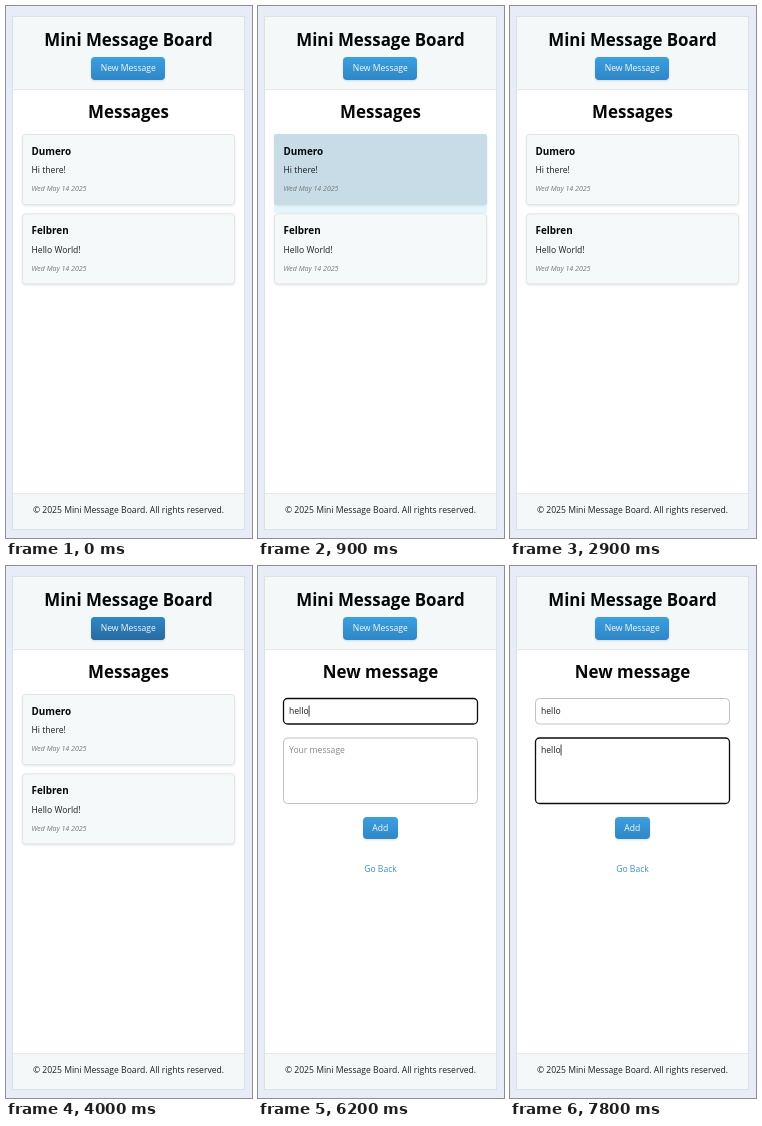
Write an HTML page that moves like this. It is 246 by 532 pixels and loops after 8000 ms.

```html
<!DOCTYPE html>
<html lang="en">
<head>
<meta charset="utf-8">
<title>Mini Message Board</title>
<style>
  html, body { margin: 0; width: 100%; height: 100%; overflow: hidden; background: #e8ecf7; }
  svg { display: block; width: 246px; height: 532px; font: 8.6px "Open Sans", "Noto Sans", sans-serif; fill: #1b1f22; }
  text { white-space: pre; }
  .mid { text-anchor: middle; }
  .title { font-weight: 700; font-size: 16.9px; fill: #050708; }
  .name { font-weight: 700; font-size: 9.9px; fill: #050708; }
  .date { font-style: italic; font-size: 7px; fill: #747a7e; }
  .link { fill: #3a8fca; }
  .hint { fill: #85898c; }
  .label { fill: #f4f9fd; }
  .option { font-size: 14px; fill: #202224; }
  .card { fill: #f5f9f9; stroke: #e0e5e7; filter: drop-shadow(0 1px 1px rgba(0, 0, 0, .1)); }
  .field { fill: #fff; stroke: #bfc2c4; }
  .field.focus { stroke: #0c0e10; stroke-width: 1.3; }
  .bar { fill: #f4f8f9; }
  .rule { fill: #e3e8ea; }
  .button { filter: drop-shadow(0 1px 1px rgba(0, 0, 0, .12)); }
  .popup { fill: #fff; filter: drop-shadow(0 1px 2px rgba(0, 0, 0, .28)); }
  .tap { fill: #33b5e5; }
</style>
</head>
<body>
<svg viewBox="0 0 246 532">
  <defs>
    <linearGradient id="blue" x2="0" y2="1">
      <stop stop-color="#3b9fe0"/><stop offset="1" stop-color="#2f86c6"/>
    </linearGradient>
    <linearGradient id="deep" x2="0" y2="1">
      <stop stop-color="#2f87c6"/><stop offset="1" stop-color="#286a9f"/>
    </linearGradient>
  </defs>

  <rect width="246" height="532" fill="#e8ecf7"/>
  <rect x="6.5" y="10.5" width="232" height="513" fill="#fff" stroke="#dce0e8"/>
  <rect class="bar" x="7" y="11" width="231" height="72"/>
  <rect class="rule" x="7" y="83" width="231" height="1"/>
  <rect class="bar" x="7" y="488" width="231" height="35"/>
  <rect class="rule" x="7" y="487" width="231" height="1"/>
  <text class="title mid" x="122.5" y="40">Mini Message Board</text>
  <rect class="button" x="85" y="51" width="74" height="23" rx="4" fill="url(#blue)"/>
  <rect id="newHover" x="85" y="51" width="74" height="23" rx="4" fill="url(#deep)"/>
  <text class="label mid" x="122.3" y="65">New Message</text>
  <text class="mid" x="122.5" y="507">© 2025 Mini Message Board. All rights reserved.</text>

  <g id="list">
    <text class="title mid" x="122.5" y="112">Messages</text>
    <g id="cards"></g>
  </g>

  <g id="detail">
    <text class="name mid" x="122.3" y="121.5">Dumero</text>
    <rect x="94" y="134.5" width="57" height="1" fill="#a9adb0"/>
    <text class="mid" x="122.3" y="154">Hi there!</text>
    <text class="date mid" x="122.3" y="177">Wed May 14 2025</text>
    <rect id="linkTap" class="tap" x="76" y="189.5" width="93" height="13.5"/>
    <text id="back" class="link mid" x="122.5" y="199">Back to message board</text>
  </g>

  <g id="form">
    <text class="title mid" x="122.5" y="112">New message</text>
    <rect id="nameField" class="field" x="25.5" y="132.5" width="194" height="25.5" rx="4"/>
    <rect id="bodyField" class="field" x="25.5" y="172" width="194" height="65.5" rx="4"/>
    <text id="nameText" x="31" y="148"></text>
    <text id="bodyText" x="31" y="187"></text>
    <rect id="caret" width="0.8" height="11" fill="#111"/>
    <rect class="button" x="105" y="251" width="35" height="22" rx="4" fill="url(#blue)"/>
    <text class="label mid" x="122.3" y="265">Add</text>
    <text class="link mid" x="122.5" y="306">Go Back</text>
    <g id="popup">
      <rect id="popupBox" class="popup" x="74" y="283" width="156.5" rx="5"/>
      <rect id="pick" x="74" y="287" width="156.5" height="36" fill="#eceef0"/>
      <g id="options"></g>
    </g>
  </g>
</svg>

<script>
const LOOP = 8000, TICK = 100;
const $ = id => document.getElementById(id);
const show = (id, on) => { $(id).style.display = on ? "" : "none"; };
const fade = (id, value) => $(id).setAttribute("opacity", value);

// Value of the last [time, value] entry that has begun
const at = (table, t) => table.reduce((v, [start, next]) => t >= start ? next : v, table[0][1]);

const cardMarkup = (name, message, y, extra = "") => `
  <rect class="card" x="16.5" y="${y + .5}" width="212" height="70" rx="3"/>${extra}
  <text class="name" x="25.5" y="${y + 21}">${name}</text>
  <text x="25.5" y="${y + 39.3}">${message}</text>
  <text class="date" x="25.5" y="${y + 57.3}">Wed May 14 2025</text>`;

$("cards").innerHTML =
  cardMarkup("Dumero", "Hi there!", 128, `
    <rect id="cardHover" x="16" y="128" width="213" height="71" rx="3" fill="#dee1e6"/>
    <rect id="cardTap" class="tap" x="16" y="128" width="213" height="79"/>`) +
  cardMarkup("Felbren", "Hello World!", 207.3);

const page = [[0, "list"], [1300, "detail"], [2900, "list"], [4400, "form"]];
const cardHover = [[0, 0], [600, .25], [700, .5], [800, .75], [900, 1], [1300, 0]];
const cardTap = [[0, 0], [600, .4], [700, .3], [800, .2], [900, .13], [1300, 0]];
const linkTap = [[0, 0], [2300, .4], [2400, .25], [2500, .13]];
const newHover = [[0, 0], [3700, .25], [3800, .5], [3900, .75], [4000, 1], [4400, 0]];
const focus = [[0, ""], [4900, "name"], [6500, "body"]];
const nameTyped = [[0, ""], [5400, "h"], [5500, "he"], [6100, "hello"]];
const bodyTyped = [[0, ""], [7100, "h"], [7200, "he"], [7500, "hel"], [7600, "hell"], [7800, "hello"]];
const everything = ["hello", "sss", "aaaa", "ggg", "ssss", "he"];
const choices = [[0, []], [4900, everything], [5500, ["hello", "he", "hey"]], [6200, []]];

function fill(field, typed, hint, focused) {
  const text = $(field + "Text");
  text.textContent = typed || hint;
  text.classList.toggle("hint", !typed);
  $(field + "Field").classList.toggle("focus", focused);
  if (!focused) return;
  const end = typed ? text.getComputedTextLength() : 0;
  $("caret").setAttribute("x", 31 + end);
  $("caret").setAttribute("y", +text.getAttribute("y") - 8.5);
}

function drawPopup(t) {
  const rows = at(choices, t);
  show("popup", rows.length > 0);
  show("pick", t >= 6100);
  $("popupBox").setAttribute("height", rows.length * 36 + 8);
  $("options").innerHTML = rows.map((row, i) =>
    `<text class="option" x="86" y="${310 + i * 36}">${row}</text>`).join("");
}

function render(t) {
  const current = at(page, t);
  for (const id of ["list", "detail", "form"]) show(id, id === current);
  fade("cardHover", at(cardHover, t));
  fade("cardTap", at(cardTap, t));
  fade("linkTap", at(linkTap, t));
  fade("newHover", at(newHover, t));
  $("back").style.textDecoration = t >= 2300 ? "underline" : "none";
  if (current !== "form") return;
  const active = at(focus, t);
  show("caret", active !== "");
  fill("name", at(nameTyped, t), "Your name", active === "name");
  fill("body", at(bodyTyped, t), "Your message", active === "body");
  drawPopup(t);
}

const begin = performance.now();
let last = -1;
function frame() {
  const tick = Math.floor((performance.now() - begin) % LOOP / TICK);
  if (tick !== last) render(tick * TICK);
  last = tick;
  requestAnimationFrame(frame);
}
frame();
</script>
</body>
</html>
```
